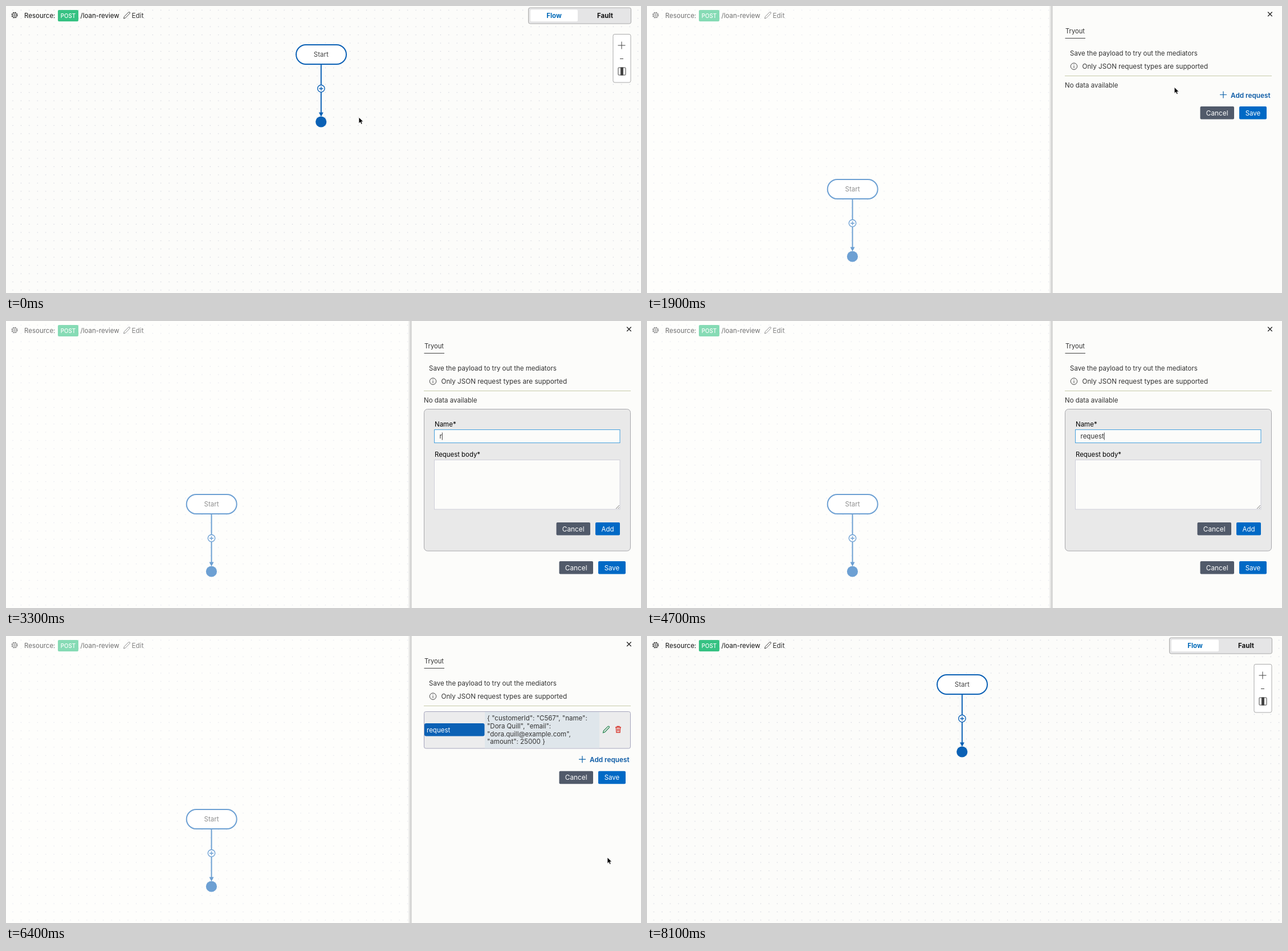
Recreate the animation shown at these times as an HTML page. Size 1114 px wide and 503 px high, loop 8200 ms.

```html
<!DOCTYPE html>
<html lang="en">
<head>
<meta charset="utf-8">
<title>Tryout request</title>
<style>
  html, body { margin: 0; width: 100%; height: 100%; overflow: hidden; background: #fcfcfa; }
  svg { display: block; font: 11.5px Inter, sans-serif; fill: #333; }
  text { white-space: pre; }
  .mid { text-anchor: middle; }
  .line { fill: none; stroke: #444; }
  .white { fill: #fff; }
  .blue { fill: #0b61b5; }
  .slate { fill: #515a6a; }
  .action { fill: #0069c5; }
  .label { fill: #000; }
  .field { fill: #fcfcfa; stroke: #cfcfda; }
  .field.focus { stroke: #45a0dd; }
</style>
</head>
<body>
<svg width="1114" height="503" viewBox="0 0 1114 503">
  <defs>
    <pattern id="dots" x="4.8" y=".1" width="14.43" height="14.43" patternUnits="userSpaceOnUse">
      <circle cx="7.2" cy="7.2" r=".75" fill="#cdd0da"/>
    </pattern>
    <linearGradient id="shade">
      <stop offset="0" stop-color="#888" stop-opacity="0"/>
      <stop offset="1" stop-color="#888" stop-opacity=".5"/>
    </linearGradient>
    <path id="pencil" d="M-5.5 5.5l.9-3.4 7.6-7.7q1-.8 2 .1t.1 2L-2.4 4.4z"/>
  </defs>

  <rect width="1114" height="503" fill="url(#dots)"/>

  <g id="flow">
    <path d="M552.8 102V188" class="line" style="stroke:#0b61b5;stroke-width:2"/>
    <path d="M548.8 186.500h8l-4 7.500z" class="blue"/>
    <rect x="509" y="68" width="88" height="34" rx="17" fill="#fff" stroke="#0b61b5" stroke-width="2"/>
    <text x="552.8" y="89" class="mid" fill="#444">Start</text>
    <g fill="#fff" stroke="#0b61b5" stroke-width="1.4">
      <circle cx="552.8" cy="144.7" r="6.2"/>
      <path d="M549.3 144.700h7M552.8 141.200v7"/>
    </g>
    <circle cx="552.7" cy="203" r="9.6" class="blue"/>
  </g>

  <g id="header">
    <g class="line">
      <circle cx="15" cy="16" r="4.8" stroke-width="1.6" stroke-dasharray="2.3 1.47"/>
      <circle cx="15" cy="16" r="3.8"/>
      <circle cx="15" cy="16" r="1.5"/>
    </g>
    <text x="32" y="21" fill="#111">Resource:</text>
    <rect x="91" y="7" width="36" height="20" rx="2" fill="#36c283"/>
    <text x="109" y="20.5" class="mid white" font-size="9.8" font-weight="500">POST</text>
    <text x="130.5" y="21" fill="#111">/loan-review</text>
    <use href="#pencil" x="212" y="16.5" class="line"/>
    <text x="220.5" y="21" font-size="11.8">Edit</text>
  </g>

  <g font-weight="700">
    <rect x="916.5" y="3" width="180" height="28" rx="3" fill="#e5e5e6" stroke="#aaa"/>
    <rect x="920" y="6.5" width="83" height="20.5" rx="2" class="white"/>
    <text x="961.5" y="21" class="mid" fill="#0069b8">Flow</text>
    <text x="1051" y="21" class="mid" fill="#111">Fault</text>
  </g>
  <g class="line">
    <rect x="1065" y="49.5" width="31" height="84.5" rx="3" style="fill:#fff;stroke:#aaa"/>
    <path d="M1073.5 69h13M1080 62.500v13M1077 92.500h6"/>
    <rect x="1074" y="108" width="13" height="13" rx="1"/>
    <rect x="1078.5" y="108" width="4" height="13" fill="#444"/>
  </g>

  <rect id="veil" width="1114" height="503" class="white"/>

  <g id="panel">
    <rect x="705" width="7" height="503" fill="url(#shade)"/>
    <rect x="711.5" width="403" height="503" fill="#fcfcfa"/>
    <path d="M1089.2 10.500l7.5 7.500m0-7.500l-7.5 7.500" class="line" stroke-width="1.3" style="stroke:#222"/>
    <text x="734" y="48" font-size="11.2">Tryout</text>
    <path d="M733.5 56.500h35.5" class="line"/>
    <text x="742" y="87">Save the payload to try out the mediators</text>
    <g class="line">
      <circle cx="749" cy="105.7" r="5.7"/>
      <path d="M749 104.800v4M749 102.300v1.2"/>
    </g>
    <text x="763.5" y="110" font-size="11.7">Only JSON request types are supported</text>
    <path d="M733 122.500h363" class="line" style="stroke:#c6cba9"/>
    <text id="empty" x="733" y="143">No data available</text>

    <g id="list">
      <rect x="733.5" y="132.5" width="362" height="64.5" rx="3" fill="#ececed" stroke="#a5a5bd"/>
      <rect x="840" y="133" width="201" height="63.5" fill="#dfe6eb"/>
      <rect x="734" y="153" width="105.5" height="22.5" rx="3" class="blue"/>
      <text x="738" y="168.5" class="white">request</text>
      <g id="summary"></g>
      <use href="#pencil" x="1053" y="164" class="line" style="stroke:#2f8a55;stroke-width:1.2"/>
      <path d="M1069 160h10M1072 160v-1.7h4v1.7M1070.3 160l.6 9h6.2l.6-9M1072.8 162v5M1075.2 162v5" class="line" style="stroke:#d8382f;stroke-width:1.3"/>
    </g>

    <g id="add">
      <path d="M1005 155.500h12M1011 149.500v12" class="line" style="stroke:#0b61a8;stroke-width:1.2"/>
      <text x="1024" y="160.5" font-size="11.8" font-weight="600" fill="#0b5aa5">Add request</text>
    </g>

    <g id="form">
      <rect id="card" x="733.5" y="154.5" width="362" height="248.5" rx="6" fill="#e9e9e9" stroke="#a8a8ac"/>
      <text x="752" y="184.5" class="label">Name*</text>
      <rect id="name" x="751.5" y="190.5" width="325.5" height="23" class="field"/>
      <text id="typed" x="760.5" y="206.3"></text>
      <path id="caret" d="M0 195.500v13" class="line"/>
      <text x="752" y="237.5" class="label" font-size="11.4">Request body*</text>
      <rect id="body" x="751.5" y="243.5" width="325.5" height="86.5" class="field"/>
      <g id="json"></g>
      <g id="formButtons">
        <path d="M1070 329l6-6M1073.5 329l2.5-2.5" class="line" style="stroke:#777"/>
        <rect x="965.5" y="353" width="59.5" height="22.5" rx="2" class="slate"/>
        <text x="995.2" y="368.5" class="mid white" font-size="11.8">Cancel</text>
        <rect x="1034" y="353" width="43" height="22.5" rx="2" class="action"/>
        <text x="1055.5" y="368.5" class="mid white">Add</text>
      </g>
    </g>

    <g id="saveButtons">
      <rect x="970.5" y="176" width="59.5" height="22.5" rx="2" class="slate"/>
      <text x="1000.2" y="191.7" class="mid white" font-size="11.8">Cancel</text>
      <rect id="save" x="1039" y="176" width="48" height="22.5" rx="2"/>
      <text x="1063" y="191.7" class="mid white">Save</text>
    </g>
  </g>

  <path id="cursor" d="M0 0V10.800L2.5 8.500L4.2 12.200L6.2 11.300L4.6 7.800H8Z" fill="#000" stroke="#fff" stroke-width=".8"/>
</svg>
<script>
const LOOP = 8200, STEP = 100;
const OPEN = 950, FORM = 2200, FOCUS_NAME = 2900, FOCUS_BODY = 5100, PASTE = 5400, ADDED = 6200, CLOSE = 7550;
const keyTimes = [3300, 3500, 3700, 4100, 4300, 4500, 4600];
const cursorPath = [
  [0, 619, 195], [700, 577, 92], [1300, 577, 92], [2200, 1047, 160], [2400, 1047, 160],
  [2900, 880, 202], [4700, 880, 202], [5100, 890, 282], [5400, 890, 282],
  [5900, 1050, 367], [6100, 1055, 388], [6400, 1055, 388], [7000, 1068, 248], [LOOP, 1068, 248]
];
const jsonLines = ['{', '"customerId": "C567",', '"name": "Dora Quill",', '"email": "dora.quill@example.com",', '"amount": 25000', '}'];
const summaryLines = ['{ "customerId": "C567", "name":', '"Dora Quill", "email":', '"dora.quill@example.com",', '"amount": 25000 }'];

const $ = id => document.getElementById(id);
const ramp = (t, from, to) => Math.min(1, Math.max(0, (t - from) / (to - from)));
const easeOut = u => 1 - (1 - u) ** 3;
const easeInOut = u => u * u * (3 - 2 * u);
const show = (id, on) => $(id).style.display = on ? '' : 'none';
const move = (id, x, y) => $(id).setAttribute('transform', `translate(${x} ${y})`);
const addLines = (id, lines, x, y) => $(id).innerHTML =
  lines.map((s, i) => `<text x="${x}" y="${y + i * 13.8}">${s}</text>`).join('');

function cursorAt(t) {
  const i = cursorPath.findIndex(p => p[0] > t);
  const [t0, x0, y0] = cursorPath[i - 1], [t1, x1, y1] = cursorPath[i];
  const u = easeInOut(ramp(t, t0, t1));
  return [x0 + (x1 - x0) * u, y0 + (y1 - y0) * u];
}

function draw(t) {
  const slide = easeOut(ramp(t, 900, 1150)) - easeOut(ramp(t, CLOSE, CLOSE + 250));
  const shift = easeOut(ramp(t, OPEN, OPEN + 600)) - easeOut(ramp(t, CLOSE, CLOSE + 500));
  move('flow', -192.3 * shift, 236 * shift);
  $('veil').style.opacity = .4 * slide;
  move('panel', 410 * (1 - slide), 0);

  const formOpen = t > FORM && t < ADDED, added = t >= ADDED;
  const grow = t >= PASTE ? 27.7 : 0;
  show('form', formOpen);
  show('add', !formOpen);
  show('empty', !added);
  show('list', added);
  $('form').style.opacity = ramp(t, FORM, FORM + 300);
  $('card').setAttribute('height', 248.5 + grow);
  $('body').setAttribute('height', 86.5 + grow);
  move('formButtons', 0, grow);
  move('add', 0, added ? 60.7 : 0);
  move('saveButtons', 0, formOpen ? 245 + grow : added ? 60.7 : 0);
  $('save').setAttribute('fill', t >= 6900 ? '#00528f' : '#0069c5');

  const nameFocus = t >= FOCUS_NAME && t < FOCUS_BODY;
  $('name').classList.toggle('focus', nameFocus);
  $('body').classList.toggle('focus', t >= FOCUS_BODY);
  $('typed').textContent = 'request'.slice(0, keyTimes.filter(k => k <= t).length);
  show('caret', nameFocus);
  if (nameFocus) move('caret', 761 + $('typed').getComputedTextLength(), 0);
  show('json', t >= PASTE);

  show('cursor', t < CLOSE + 150 && !(t >= keyTimes[0] && t < 4800));
  move('cursor', ...cursorAt(t));
}

addLines('json', jsonLines, 760.5, 264);
addLines('summary', summaryLines, 844, 148);

function tick() {
  draw(Math.floor(performance.now() % LOOP / STEP) * STEP);
  requestAnimationFrame(tick);
}
tick();
</script>
</body>
</html>
```
